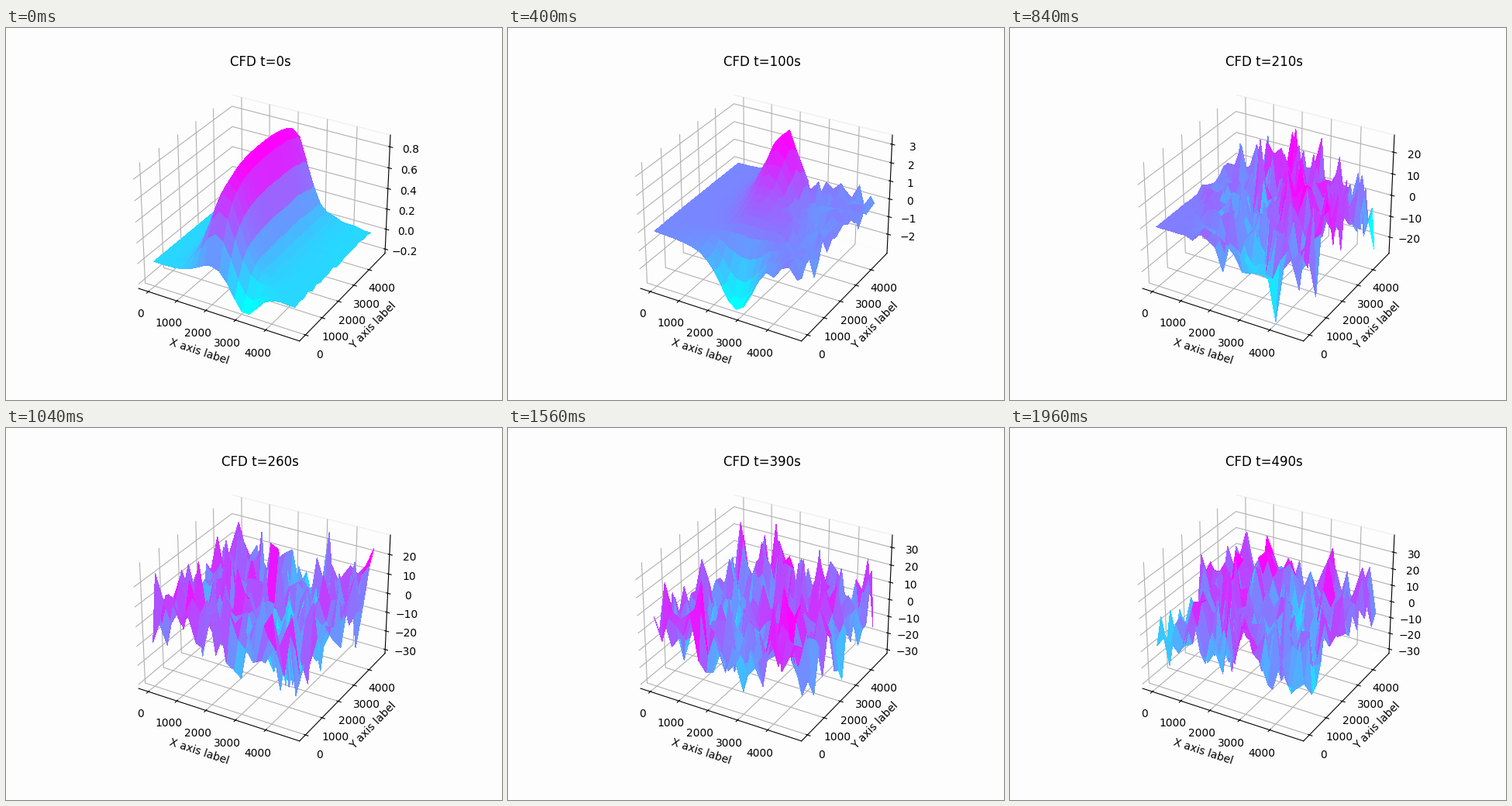
These frames come from a looping animation (640 by 480 pixels, 2000 ms). A matplotlib script:

```python
import numpy as np
import matplotlib.pyplot as plt
from matplotlib.animation import FuncAnimation

N, STEP, FRAMES = 20, 250, 50
BG = "#fdfdfd"

# Highest and lowest level at a few steps; exponential growth in between.
KEYS = [0, 6, 14, 21, 32, 39, 49]
HIGH = [0.888, 1.03, 11, 26.7, 31, 35.6, 38.8]
LOW = [0.22, 0.7, 12.6, 26.8, 36.5, 30.9, 31.3]

I, J = np.meshgrid(np.arange(N), np.arange(N))
X, Y = I * STEP, J * STEP
U, V = I / (N - 1), J / (N - 1)
ZIGZAG = (-1.0) ** (I + J)

rng = np.random.default_rng(7)
A, B = rng.normal(size=(2, N, N))
OMEGA = rng.uniform(0.3, 0.7, (N, N))


def bell(x, center, width):
    return np.exp(-((x - center) / width) ** 2 / 2)


def spot(u, v, su, sv):
    return bell(U, u, su) * bell(V, v, sv)


def ridge():
    """Long initial wave, running along y."""
    along = (1 - np.exp(-(V + 0.02) / 0.12)) * (1 - 0.12 * V ** 6)
    return (0.85 * bell(U, 0.43, 0.105) * along
            + 0.03 * bell(U, 0.7, 0.07) - 0.25 * spot(0.66, 0, 0.08, 0.06))


def ramp():
    """The wave after its near end has sunk."""
    along = (0.98 - 1.65 * np.exp(-V / 0.28)) * (1 - 0.2 * V ** 8)
    center = 0.49 + 0.11 * np.exp(-V / 0.2)
    return along * (0.88 * bell(U, center, 0.095) + 0.12 * bell(U, 0.4, 0.22))


def peak():
    """Single mountain that grows out of the wave."""
    return (11 * spot(0.45, 0.78, 0.085, 0.14)
            - 12 * spot(0.56, 0.97, 0.05, 0.06)
            - 6 * spot(0.56, 0.06, 0.12, 0.09)
            + 3 * spot(0.72, 0.35, 0.08, 0.1))


def chop(k):
    """Jagged waves, spreading from the far right corner."""
    noise = A * np.cos(OMEGA * k) + B * np.sin(OMEGA * k)
    swell = np.sin(7 * U + 4 * V - 0.3 * k)
    reach = np.interp(k, [14, 21, 28], [0.9, 0.4, -0.5])
    spread = 1 / (1 + np.exp(-(U + 0.5 * V - reach) / 0.06))
    return spread * (9 * noise + 5 * ZIGZAG * swell + 3 * swell)


def level(k):
    """Water level on the grid at step k."""
    mix = min(k / 6, 1)
    grow = np.exp((k - 14) / (1.9 if k < 14 else -8))
    z = ((1 - mix) * ridge() + mix * ramp() + grow * peak()
         + np.exp(min(k - 21, 0) / 3) * chop(k))
    high, low = (np.exp(np.interp(k, KEYS, np.log(e))) for e in (HIGH, LOW))
    return np.where(z > 0, z * high / z.max(), -z * low / z.min())


def trim_ticks(axis, data):
    axis.set_ticks([t for t in axis.get_majorticklocs()
                    if data.min() <= t <= data.max()])


fig = plt.figure(figsize=(6.4, 4.8), dpi=100, facecolor=BG)
ax = fig.add_subplot(projection="3d", facecolor=BG)


def draw(k):
    z = level(k)
    ax.clear()
    ax.plot_surface(X, Y, z, cmap="cool", linewidth=0, antialiased=False)
    for axis, data in zip((ax.xaxis, ax.yaxis, ax.zaxis), (X, Y, z)):
        axis.set_pane_color(BG)
        trim_ticks(axis, data)
    ax.yaxis.pane.set_edgecolor("#f0f0f0")
    ax.set_title(f"CFD t={10 * k}s")
    ax.set_xlabel("X axis label")
    ax.set_ylabel("Y axis label")


anim = FuncAnimation(fig, draw, frames=FRAMES, init_func=lambda: None,
                     interval=40, repeat=True, repeat_delay=0)
plt.show()
```
